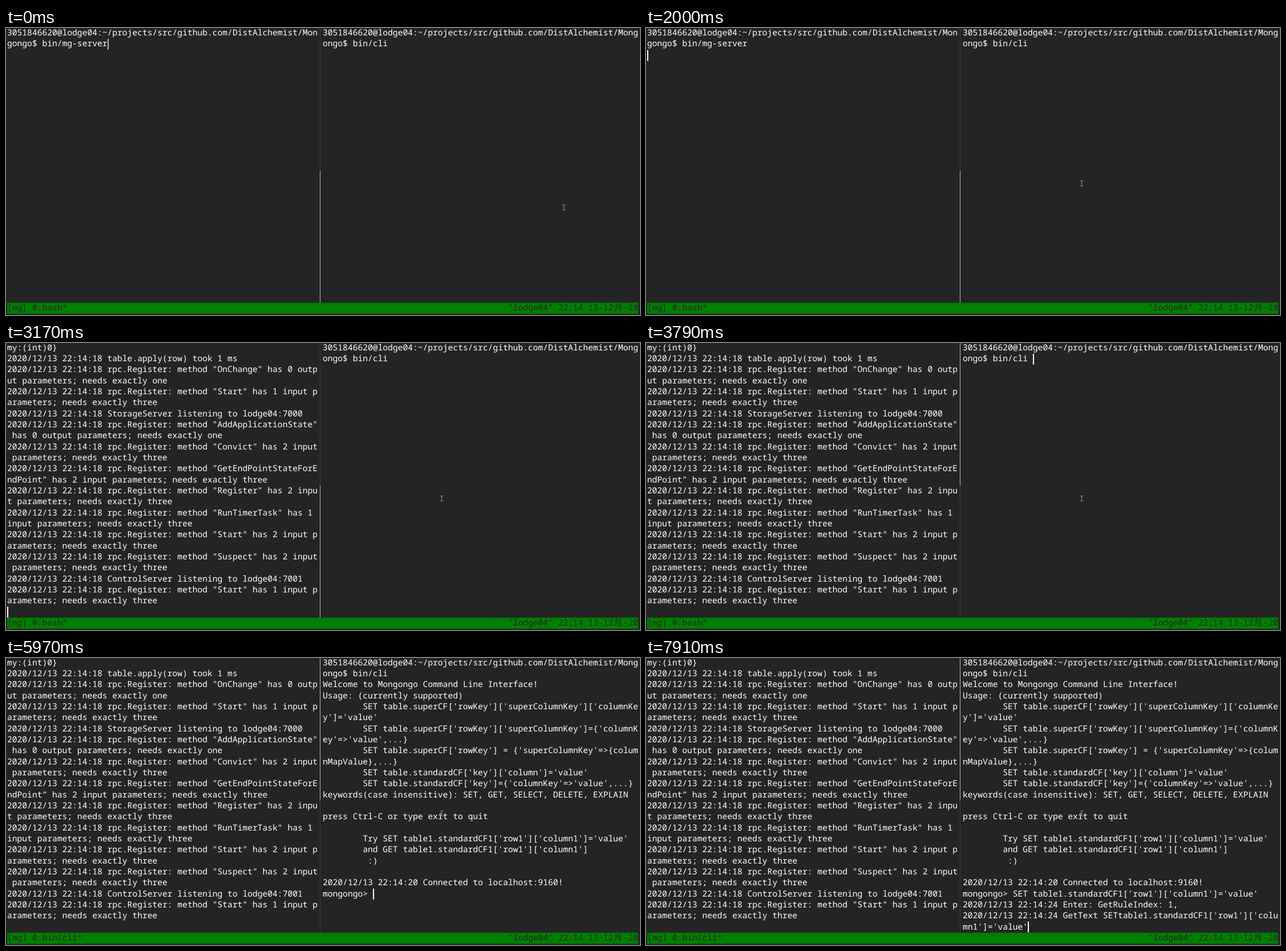
These frames come from a looping animation (1111 px wide and 504 px high, 8000 ms). An HTML page:

```html
<!DOCTYPE html>
<html lang="en">
<head>
<meta charset="utf-8">
<title>Terminal session</title>
<style>
  html, body { margin: 0; width: 100%; height: 100%; overflow: hidden; background: #242424; }
  body { position: relative; }
  body > * { position: absolute; }
  pre {
    margin: 0; top: -1.2px; color: #fff;
    font: 14.63px/19.33px "Noto Sans Mono", "Noto Sans CJK SC", monospace;
    font-variant-ligatures: none; text-rendering: geometricPrecision;
  }
  #left { left: 2px; }
  #right { left: 555px; }
  #title, #clock { top: 482px; color: #242424; }
  #title { left: 2px; }
  #clock { left: 879.8px; }
  #clock span { display: inline-block; width: 17.56px; height: 19.33px; vertical-align: top; text-align: center; }
  #lines { left: 0; top: 0; }
  #caret { width: 2px; height: 19px; }
  #pointer { width: 5px; height: 10px; fill: none; stroke: #c8c8c8; stroke-width: .8; }
</style>
</head>
<body>
<svg id="lines" width="1111" height="504">
  <rect id="upper" x="550.2" width=".7" height="250.5"/>
  <rect id="lower" x="550.2" y="250.5" width=".7" height="232"/>
  <rect x="2" y="482.5" width="1106" height="19.33" fill="green"/>
</svg>
<pre id="left"></pre>
<pre id="right"></pre>
<pre id="title"></pre>
<pre id="clock">"lodge04" 22:14 13-12<span>月</span>-20</pre>
<div id="caret"></div>
<svg id="pointer" viewBox="0 0 5 10"><path d="M0 .5H2M3 .5H5M2.5 1V9M0 9.5H2M3 9.5H5"/></svg>
<script>
const $ = id => document.getElementById(id);
const LOOP = 8000, CELL = 8.778, ROW = 19.3;
const wrap = (text, cols) => text.replace(new RegExp(`(.{${cols}})(?=.)`, "g"), "$1\n");

const prompt = "3051846620@lodge04:~/projects/src/github.com/DistAlchemist/Mongongo$ ";
const log = text => "2020/12/13 22:14:18 " + text;
const reg = (name, n, kind = "input", need = "three") =>
  log(`rpc.Register: method "${name}" has ${n} ${kind} parameters; needs exactly ${need}`);

const serverLog = [
  "my:(int)0}",
  log("table.apply(row) took 1 ms"),
  reg("OnChange", 0, "output", "one"),
  reg("Start", 1),
  log("StorageServer listening to lodge04:7000"),
  reg("AddApplicationState", 0, "output", "one"),
  reg("Convict", 2),
  reg("GetEndPointStateForEndPoint", 2),
  reg("Register", 2),
  reg("RunTimerTask", 1),
  reg("Start", 2),
  reg("Suspect", 2),
  log("ControlServer listening to lodge04:7001"),
  reg("Start", 1)
].join("\n");

const cell = "table1.standardCF1['row1']['column1']";
const cliStart = prompt + "bin/cli";
const cliReady = cliStart + `
Welcome to Mongongo Command Line Interface!
Usage: (currently supported)
        SET table.superCF['rowKey']['superColumnKey']['columnKey']='value'
        SET table.superCF['rowKey']['superColumnKey']={'columnKey'=>'value',...}
        SET table.superCF['rowKey'] = {'superColumnKey'=>{columnMapValue},...}
        SET table.standardCF['key']['column']='value'
        SET table.standardCF['key']={'columnKey'=>'value',...}
keywords(case insensitive): SET, GET, SELECT, DELETE, EXPLAIN

press Ctrl-C or type exit to quit

        Try SET ${cell}='value'
        and GET ${cell}
         :)

2020/12/13 22:14:20 Connected to localhost:9160!
mongongo> `;
const cliSet = cliReady + `SET ${cell}='value'`;
const cliDone = cliSet + `
2020/12/13 22:14:24 Enter: GetRuleIndex: 1,
2020/12/13 22:14:24 GetText SET${cell}='value'`;

// Each step changes part of the state from its time on; caret is [column, row].
const steps = [
  [0, { left: prompt + "bin/mg-server", right: cliStart, title: "bash", rightActive: false,
        caret: [20, 1], ink: "#b8b8b8", on: true, mouse: [975, 310] }],
  [350, { mouse: [905, 297] }],
  [430, { mouse: [830, 282] }],
  [500, { mouse: [780, 272] }],
  [580, { mouse: [761, 268] }],
  [810, { on: false, mouse: [763, 269] }],
  [900, { mouse: [764, 270] }],
  [1050, { on: true, ink: "#fff", mouse: [761, 268] }],
  [1600, { on: false }],
  [2000, { on: true, caret: [0, 2] }],
  [2070, { left: serverLog, caret: [0, 24] }],
  [2610, { on: false }],
  [3170, { on: true }],
  [3570, { title: "bin/mg-server" }],
  [3720, { title: "bash", rightActive: true, on: false }],
  [3790, { on: true, caret: [77, 1] }],
  [4250, { right: cliReady, title: "bin/cli", on: false }],
  [4330, { on: true, caret: [73, 21] }],
  [5420, { on: false }],
  [5970, { on: true }],
  [6120, { right: cliReady + "GET " + cell, caret: [114, 21] }],
  [6670, { on: false }],
  [6840, { right: cliSet, on: true, caret: [122, 21] }],
  [7910, { right: cliDone, caret: [76, 24] }]
];

function place(id, x, y) {
  $(id).style.left = x + "px";
  $(id).style.top = y + "px";
}

function draw(t) {
  const s = Object.assign({}, ...steps.filter(([at]) => at <= t).map(([, change]) => change));
  $("left").textContent = wrap(s.left, 62);
  $("right").textContent = wrap(s.right, 63);
  $("title").textContent = `[mg] 0:${s.title}*`;
  $("upper").style.fill = s.rightActive ? "#fff" : "green";
  $("lower").style.fill = s.rightActive ? "green" : "#fff";
  $("caret").style.background = s.on ? s.ink : "none";
  place("caret", Math.round(2 + s.caret[0] * CELL), Math.round(s.caret[1] * ROW));
  place("pointer", ...s.mouse);
}

const start = performance.now();
function tick() {
  draw((performance.now() - start) % LOOP);
  requestAnimationFrame(tick);
}
tick();
</script>
</body>
</html>
```
